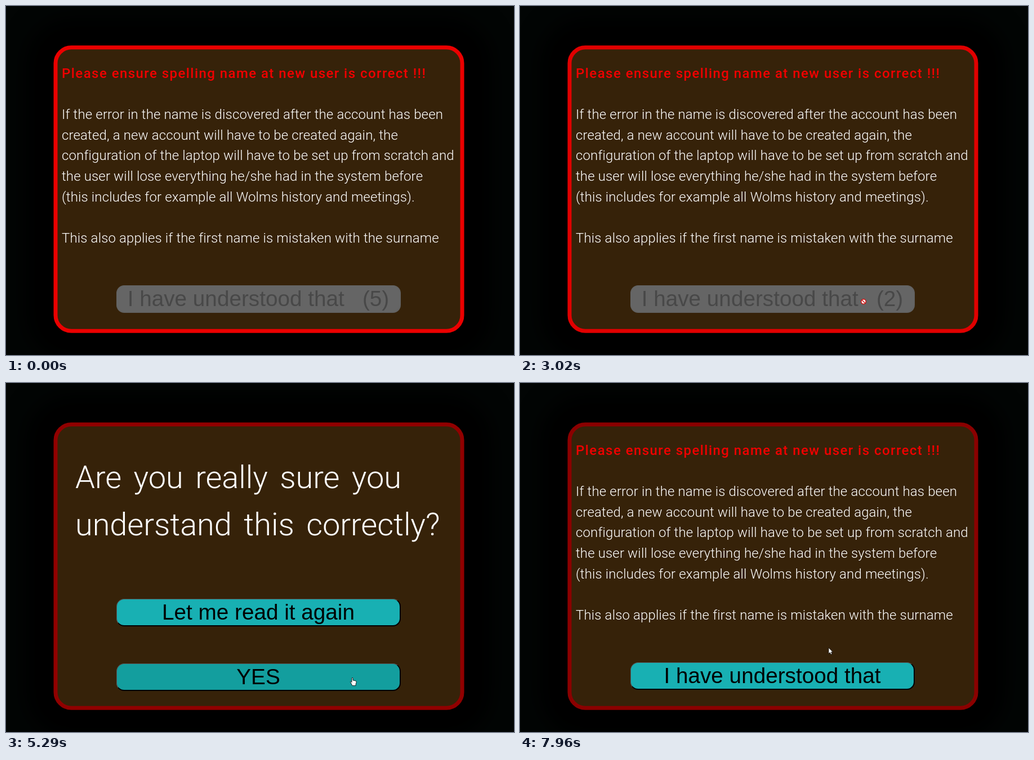
An HTML page for the animation above (8 s loop, 902 px wide and 621 px high).

```html
<!DOCTYPE html>
<html lang="en">
<head>
<meta charset="utf-8">
<title>Confirm dialog</title>
<style>
  html, body { margin: 0; width: 100%; height: 100%; overflow: hidden; background: #020504; }
  #stage { position: relative; width: 902px; height: 621px; overflow: hidden; }
  #stage > *, .page > * { position: absolute; box-sizing: border-box; }
  .page, svg { inset: 0; }
  #shade { left: 85px; top: 71px; width: 728px; height: 510px; border-radius: 32px; box-shadow: 0 0 40px 50px #000; }
  .text { color: #fff; white-space: pre; font: 350 24px/36.65px Roboto, sans-serif; letter-spacing: .14px; }
  #warning { left: 99px; top: 101.8px; }
  #warning b { color: #f00000; font-weight: 500; letter-spacing: 1.43px; }
  #question { left: 123px; top: 125.6px; font-size: 56px; line-height: 84.5px;
    letter-spacing: -.1px; word-spacing: 8px; }
  .button { left: 196px; width: 505px; height: 49px; border: outset #000; border-width: 1px 2px 2px 1px;
    border-radius: 14px; background: #18b0b3; color: #000; text-align: center; white-space: pre;
    font: 38.7px/46px "Liberation Sans", Arial, sans-serif; }
  .button.hover { background: #139e9e; }
  .button.disabled { background: #656565; border-color: #626262; border-style: solid; color: #484848; }
  #understood { top: 497px; }
  #again { top: 384px; }
  #yes { top: 499px; }
</style>
</head>
<body>
<div id="stage">
  <div id="shade"></div>
  <svg width="902" height="621">
    <rect id="box" x="88" y="73.800" width="722" height="504.500" rx="28" fill="#362209" stroke-width="7"/>
  </svg>
  <div class="page" id="notice">
    <div class="text" id="warning"><b>Please ensure spelling name at new user is correct !!!</b>

If the error in the name is discovered after the account has been
created, a new account will have to be created again, the
configuration of the laptop will have to be set up from scratch and
the user will lose everything he/she had in the system before
(this includes for example all Wolms history and meetings).

This also applies if the first name is mistaken with the surname</div>
    <div class="button" id="understood"></div>
  </div>
  <div class="page" id="confirm">
    <div class="text" id="question">Are you really sure you
understand this correctly?</div>
    <div class="button" id="again">Let me read it again</div>
    <div class="button" id="yes">YES</div>
  </div>
  <svg width="902" height="621">
    <g id="cursor">
      <circle id="click" cx="1" cy="1" r="10" fill="#bdb800" fill-opacity=".7"/>
      <path id="arrow" d="M0 0V10.500L2.500 8.300 4 12 6 11.200 4.500 7.600H7.500Z" fill="#fff" stroke="#000" stroke-width=".7"/>
      <path id="hand" d="M-1 1Q0-1 1 1V5L6 6Q7.500 6.500 7 9L6 12V14.500H0L-3 9Q-4.500 7-2.500 7L-1 8.500Z" fill="#fff" stroke="#000" stroke-width=".8"/>
      <g id="blocked" stroke="#d01010" stroke-width="1.5">
        <circle r="4.200" fill="#fff"/><path d="M-3-3 3 3"/>
      </g>
    </g>
  </svg>
</div>
<script>
const LOOP = 8000, CONFIRM_AT = 4930, RETURN_AT = 7480;
const FIRST_TICK = 350, ENABLED_AT = FIRST_TICK + 4000;
const $ = id => document.getElementById(id);
const show = (id, on) => { $(id).style.display = on ? '' : 'none'; };
const between = (t, a, b) => t >= a && t < b;

// time, x, y of the pointer's hot spot
const path = [
  [420, 912, 505], [500, 876, 507], [1300, 604, 527], [1920, 604, 527],
  [3020, 610, 526], [4300, 615, 524], [5900, 615, 524], [6010, 595, 505],
  [6200, 580, 487], [6750, 548, 414], [7600, 548, 414], [7960, 548, 471], [8000, 548, 475]
];

function pointerAt(t) {
  const i = path.findIndex(p => p[0] > t);
  if (i < 1) return path[0].slice(1);
  const [t0, x0, y0] = path[i - 1], [t1, x1, y1] = path[i];
  const k = (t - t0) / (t1 - t0);
  return [x0 + (x1 - x0) * k, y0 + (y1 - y0) * k];
}

// cubic-bezier(.25, .1, .25, 1)
function ease(x) {
  const bezier = (s, a, b) => 3 * a * s * (1 - s) ** 2 + 3 * b * s * s * (1 - s) + s ** 3;
  let lo = 0, hi = 1;
  for (let i = 0; i < 20; i++) {
    const mid = (lo + hi) / 2;
    if (bezier(mid, .25, .25) < x) lo = mid; else hi = mid;
  }
  return bezier(lo, .1, 1);
}

// border pulses from red to darkred and back once a second
function borderRed(elapsed) {
  const phase = elapsed % 1000 / 500;
  const dark = phase < 1 ? ease(phase) : 1 - ease(phase - 1);
  return 255 - 116 * dark;
}

function draw(t) {
  const confirming = between(t, CONFIRM_AT, RETURN_AT);
  const disabled = t < ENABLED_AT;
  const opened = t >= RETURN_AT ? RETURN_AT : confirming ? CONFIRM_AT : -70;
  $('box').setAttribute('stroke', `rgb(${borderRed(t - opened)}, 0, 0)`);
  show('notice', !confirming);
  show('confirm', confirming);

  const left = 5 - Math.max(0, Math.ceil((t - FIRST_TICK) / 1000));
  $('understood').textContent = 'I have understood that' + (disabled ? `   (${left})` : '');
  $('understood').classList.toggle('disabled', disabled);

  const [x, y] = pointerAt(t);
  let over = false;
  for (const [id, top] of confirming ? [['again', 384], ['yes', 499]] : [['understood', 497]]) {
    const hover = between(x, 196, 701) && between(y, top, top + 49);
    $(id).classList.toggle('hover', hover);
    over = over || hover;
  }
  $('cursor').setAttribute('transform', `translate(${x} ${y})`);
  show('arrow', !over);
  show('hand', over && !disabled);
  show('blocked', over && disabled);
  show('click', between(t, 4740, 4920) || between(t, 7040, 7240));
}

function frame() {
  draw(performance.now() % LOOP);
  requestAnimationFrame(frame);
}
frame();
</script>
</body>
</html>
```
